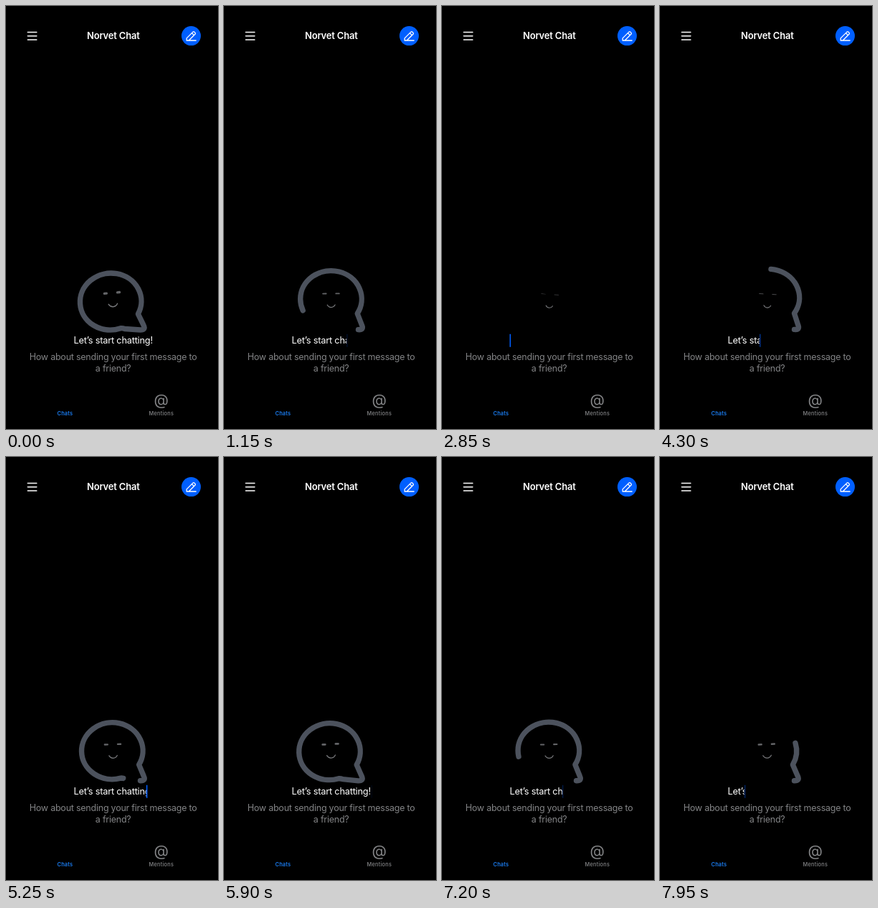
An HTML page with a canvas that plays this animation: 296 px wide and 589 px high, repeating every 8000 ms.

```html
<!DOCTYPE html>
<html lang="en">
<head>
<meta charset="utf-8">
<title>Empty chat list</title>
<style>
  html, body { margin: 0; width: 100%; height: 100%; overflow: hidden; background: #000; }
  canvas { display: block; width: 296px; height: 589px; }
</style>
</head>
<body>
<canvas id="stage"></canvas>
<script>
const W = 296, H = 589, LOOP = 8000;
const FONT = 'Inter, "Liberation Sans", sans-serif';
const GREY = '#828385', BLUE = '#005fff';

const canvas = document.getElementById('stage');
const ctx = canvas.getContext('2d');
const dpr = window.devicePixelRatio || 1;
canvas.width = W * dpr;
canvas.height = H * dpr;

const OUTLINE = 'M187.5 450.6 Q195.5 451.2 192.6 444.5 L186.4 428.2 ' +
  'A42.8 39.5 0 1 0 160.4 446 Q163 445.8 166 447.2 Z';
const bubble = new Path2D(OUTLINE);
const probe = document.createElementNS('http://www.w3.org/2000/svg', 'path');
probe.setAttribute('d', OUTLINE);
const bubbleLength = probe.getTotalLength();

const TAIL = [192, 451];       // pivot of the bubble
const FACE = [136, 419];       // pivot of the face
const TILT = 5 * Math.PI / 180;
const TEXT_X = 94.5, TEXT_W = 111;
const TRAVEL = 2700, CYCLE = 6000;

// cubic-bezier(.42, 0, .58, 1)
function ease(x) {
  let lo = 0, hi = 1;
  for (let i = 0; i < 20; i++) {
    const s = (lo + hi) / 2, r = 1 - s;
    if (1.26 * s * r * r + 1.74 * s * s * r + s * s * s < x) lo = s; else hi = s;
  }
  return lo * lo * (3 - 2 * lo);
}

const wave = (t, period, peak) => (1 + Math.cos(2 * Math.PI * (t - peak) / period)) / 2;

// Erase, pause, write, pause.
function writing(t) {
  const p = (t - 108 + CYCLE) % CYCLE, half = CYCLE / 2;
  const progress = ease(Math.min(1, (p % half) / TRAVEL));
  return p < half ? 1 - progress : progress;
}

function poseAt(t) {
  if (t < 100) return { sway: 0, drawn: 1, caret: 0 };
  if (t < 500) t = 100;
  return { sway: wave(t, 2000, 620), drawn: writing(t), caret: wave(t, 1200, 400) };
}

function text(str, x, y, size, color, weight = 400, align = 'center', spacing = 0) {
  ctx.font = `${weight} ${size}px ${FONT}`;
  ctx.letterSpacing = spacing + 'px';
  ctx.textAlign = align;
  ctx.fillStyle = color;
  ctx.fillText(str, x, y);
}

function stroke(path, color, width) {
  ctx.strokeStyle = color;
  ctx.lineWidth = width;
  ctx.lineCap = ctx.lineJoin = 'round';
  ctx.stroke(path);
}

function rotateAbout([x, y], angle) {
  ctx.translate(x, y);
  ctx.rotate(angle);
  ctx.translate(-x, -y);
}

const menuIcon = new Path2D('M30.3 36.6H42.8 M30.3 41.7H42.8 M30.3 46.9H42.8');
const penIcon = new Path2D('M252.2 48V44.9L261.2 35.9Q262 35.3 262.8 36L264.2 37.4' +
  'Q264.8 38.2 264.2 39L255.2 48Z M259.6 37.8L262.4 40.6 M255.2 48H265.2');
const smile = new Path2D('M-6.2 -2C-3.5 3.2 3.5 3.2 6.2 -2');

function drawChrome() {
  stroke(menuIcon, '#fff', 1.5);
  text('Norvet Chat', 149.8, 46.4, 13, '#fff', 600, 'center', -0.2);
  ctx.fillStyle = BLUE;
  ctx.beginPath();
  ctx.arc(258.5, 41.6, 13.5, 0, 7);
  ctx.fill();
  stroke(penIcon, '#fff', 1.3);

  text('How about sending your first message to', 149.7, 493, 12.5, GREY, 400, 'center', -0.23);
  text('a friend?', 149.7, 509.2, 12.5, GREY, 400, 'center', -0.23);

  text('Chats', 82.4, 570.2, 7.4, '#1a7cf0', 600, 'center', 0.2);
  text('@', 216.8, 556.2, 21.2, GREY);
  text('Mentions', 216.8, 570.2, 7.4, GREY, 500, 'center', 0.25);
}

function drawBubble(sway, drawn) {
  if (drawn < 0.002) return;
  ctx.save();
  rotateAbout(TAIL, TILT * (2 * sway - 1));
  ctx.setLineDash(drawn < 1 ? [drawn * bubbleLength, bubbleLength * 2] : []);
  stroke(bubble, '#4c525d', 7.4);
  ctx.restore();
}

function drawFace(sway) {
  ctx.save();
  rotateAbout(FACE, TILT * (2 * sway - 1));

  const open = 3.4 * (1 - sway);
  ctx.fillStyle = '#636467';
  for (const x of [140.5, 158.7]) {
    ctx.beginPath();
    ctx.roundRect(x - 3.2, 400.6 - open / 2, 6.4, open, open / 2);
    ctx.fill();
  }

  const k = 1 - 0.28 * sway;
  ctx.translate(149.7, 418);
  ctx.scale(k, k);
  stroke(smile, '#77787b', 1.4);
  ctx.restore();
}

function drawHeadline(drawn, caret) {
  const edge = TEXT_X + TEXT_W * drawn;
  ctx.save();
  ctx.beginPath();
  ctx.rect(TEXT_X - 1, 452, edge - TEXT_X + 1, 26);
  ctx.clip();
  text('Let’s start chatting!', TEXT_X, 470.2, 12.8, '#fff', 400, 'left', -0.23);
  ctx.restore();

  ctx.globalAlpha = caret;
  ctx.fillStyle = BLUE;
  ctx.fillRect(edge, 456.8, 1.6, 18);
  ctx.globalAlpha = 1;
}

function render(now) {
  const { sway, drawn, caret } = poseAt(now % LOOP);
  ctx.setTransform(dpr, 0, 0, dpr, 0, 0);
  ctx.fillStyle = '#000';
  ctx.fillRect(0, 0, W, H);
  drawChrome();
  drawBubble(sway, drawn);
  drawFace(sway);
  drawHeadline(drawn, caret);
}

const start = performance.now();
function tick() {
  render(performance.now() - start);
  requestAnimationFrame(tick);
}
tick();
</script>
</body>
</html>
```
